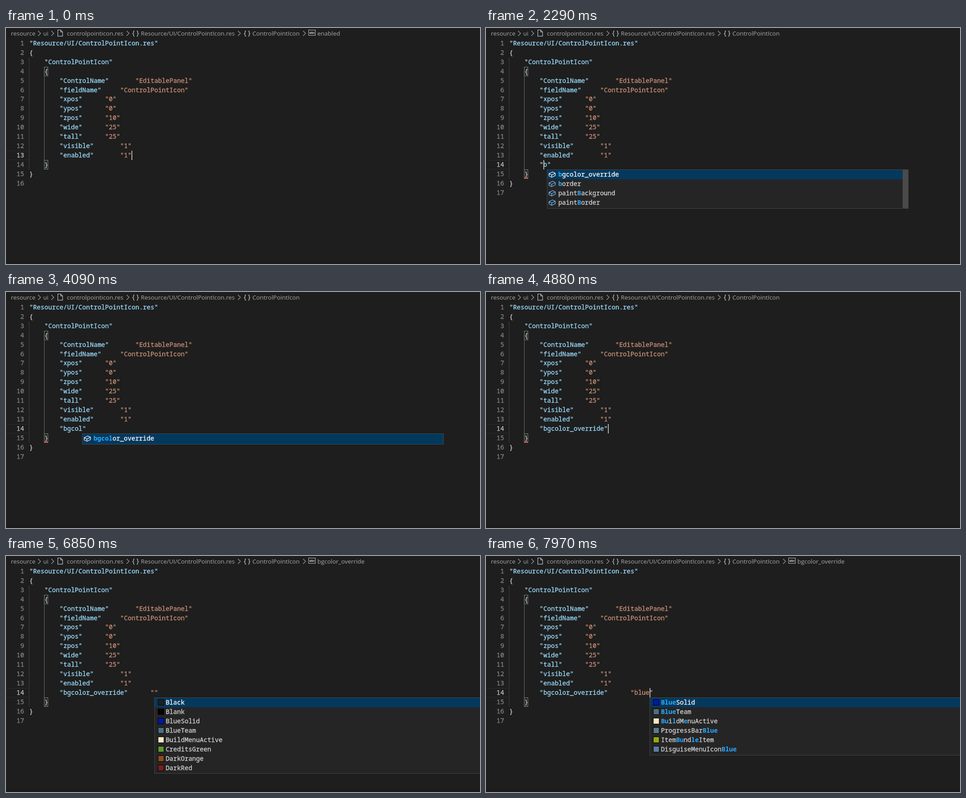
An HTML page with a canvas for the animation above (7.99 s loop, 1058 by 529 pixels).

```html
<!DOCTYPE html>
<html lang="en">
<head>
<meta charset="utf-8">
<title>Editor completion</title>
<style>
  html, body { margin: 0; width: 100%; height: 100%; overflow: hidden; background: #1e1e1e; }
  canvas { display: block; }
</style>
</head>
<body>
<canvas width="1058" height="529"></canvas>
<script>
const ctx = document.querySelector('canvas').getContext('2d');
const LOOP = 7990;
const LEFT = 51.945, CHAR = 8.455, TOP = 23.9, ROW = 20.93;
const MONO = '14.2px "Noto Sans Mono", monospace';
const SANS = '13.45px "Open Sans", "Noto Sans", sans-serif';
const KEY = '#9cdcfe', VALUE = '#ce9178', PLAIN = '#d4d4d4';

const colX = col => LEFT + col * CHAR;
const rowY = row => TOP + (row - 1) * ROW;

const pair = (key, value) => `\t\t"${key}"\t\t"${value}"`;
const HEAD = [
  '"Resource/UI/ControlPointIcon.res"', '{', '\t"ControlPointIcon"', '\t{',
  pair('ControlName', 'EditablePanel'), pair('fieldName', 'ControlPointIcon'),
  pair('xpos', 0), pair('ypos', 0), pair('zpos', 10), pair('wide', 25), pair('tall', 25),
  pair('visible', 1), pair('enabled', 1)
];
const TAIL = ['\t}', '}', ''];

const SWATCHES = {
  Black: '#1e1e1e', Blank: '#000', BlueSolid: '#0018a4', BlueTeam: '#4d6d7e',
  HudBlack: '#111', BuildMenuActive: '#ffe6c4', ProgressBarBlue: '#5b7a8c',
  TransparentBlack: '#000', ItemBundleItem: '#93a90c', DisguiseMenuIconBlue: '#5b7aa2',
  CreditsGreen: '#5e9631', DarkOrange: '#904a1e', DarkRed: '#781e1e', HudPanelBorder: '#35302c'
};

// Matched letters stand in square brackets.
const list = (col, items, swatches = false) => ({ col, swatches, items: items.split(' ') });
const props = (col, items) => list(col, items);
const colors = (col, items) => list(col, items, true);

const OVERRIDE = '"bgcolor_override"';
const STEPS = [
  [0, { entry: null, row: 13, caret: 27, on: true, crumb: 'enabled', popup: null, error: false, bar: false }],
  [180, { on: false }],
  [610, { on: true }],
  [1040, { on: false }],
  [1070, { entry: '' }],
  [1100, { row: 14, caret: 8 }],
  [1130, { on: true }],
  [1410, { crumb: '' }],
  [1590, { on: false }],
  [1770, { entry: '""' }],
  [1800, { on: true, caret: 9 }],
  [1850, { popup: props(9, 'alpha autoResize bgcolor_override border centerwrap command default font') }],
  [1890, { error: true }],
  [2290, { entry: '"b"', bar: true, popup: props(10, '[b]gcolor_override [b]order paint[B]ackground paint[B]order') }],
  [2310, { caret: 10 }],
  [2340, { bar: false }],
  [2580, { entry: '"bg"' }],
  [2610, { caret: 11 }],
  [2640, { popup: props(11, '[bg]color_override paint[B]ack[g]round') }],
  [2940, { entry: '"bgc"' }],
  [2960, { caret: 12 }],
  [2990, { popup: props(12, '[bgc]olor_override paint[B]a[c]k[g]round') }],
  [3240, { entry: '"bgco"' }],
  [3270, { caret: 13 }],
  [3300, { popup: props(13, '[bgco]lor_override paint[B]a[c]k[g]r[o]und') }],
  [3510, { entry: '"bgcol"' }],
  [3540, { caret: 14 }],
  [3590, { popup: props(14, '[bgcol]or_override') }],
  [4090, { on: false }],
  [4240, { popup: null }],
  [4270, { entry: OVERRIDE }],
  [4300, { caret: 25, on: true }],
  [4610, { caret: 26 }],
  [4910, { entry: OVERRIDE + '\t' }],
  [4940, { caret: 28 }],
  [5250, { entry: OVERRIDE + '\t\t' }],
  [5280, { caret: 32 }],
  [5810, { on: false }],
  [6240, { on: true }],
  [6300, { entry: OVERRIDE + '\t\t""' }],
  [6330, { caret: 33 }],
  [6360, { popup: colors(33, 'Black Blank BlueSolid BlueTeam BuildMenuActive CreditsGreen DarkOrange DarkRed') }],
  [6390, { error: false }],
  [6670, { crumb: 'bgcolor_override' }],
  [6850, { on: false }],
  [7100, { entry: OVERRIDE + '\t\t"b"' }],
  [7120, { caret: 34, on: true }],
  [7150, { popup: colors(34, '[B]lack [B]lank [B]lueSolid [B]lueTeam [B]uildMenuActive Hud[B]lack HudPanel[B]order Progress[B]arBlue') }],
  [7340, { entry: OVERRIDE + '\t\t"bl"' }],
  [7360, { caret: 35, popup: colors(35, '[Bl]ack [Bl]ank [Bl]ueSolid [Bl]ueTeam Hud[Bl]ack [B]ui[l]dMenuActive ProgressBar[Bl]ue Transparent[Bl]ack') }],
  [7700, { entry: OVERRIDE + '\t\t"blu"' }],
  [7730, { caret: 36 }],
  [7760, { popup: colors(36, '[Blu]eSolid [Blu]eTeam [Bu]i[l]dMenuActive ProgressBar[Blu]e Item[Bu]nd[l]eItem DisguiseMenuIcon[Blu]e') }],
  [7940, { entry: OVERRIDE + '\t\t"blue"' }],
  [7970, { caret: 37, popup: colors(37, '[Blue]Solid [Blue]Team [Bu]i[l]dM[e]nuActive ProgressBar[Blue] Item[Bu]nd[le]Item DisguiseMenuIcon[Blue]') }]
];

function stateAt(time) {
  return Object.assign({}, ...STEPS.filter(([start]) => start <= time).map(([, change]) => change));
}

function rect(x, y, w, h, color) {
  ctx.fillStyle = color;
  ctx.fillRect(x, y, w, h);
}

function frame(x, y, w, h, color) {
  ctx.strokeStyle = color;
  ctx.lineWidth = 1;
  ctx.strokeRect(x + .5, y + .5, w - 1, h - 1);
}

function polyline(color, width, ...points) {
  ctx.strokeStyle = color;
  ctx.lineWidth = width;
  ctx.beginPath();
  points.forEach(([x, y]) => ctx.lineTo(x, y));
  ctx.stroke();
}

// Lays letters on the fixed character grid and returns the end position.
// A hairline outline gives regular letters a slightly heavier weight.
function mono(text, x, top, color, bold = false) {
  const baseline = Math.round(top + 15);
  ctx.font = (bold ? 'bold ' : '') + MONO;
  ctx.fillStyle = ctx.strokeStyle = color;
  ctx.lineWidth = .3;
  for (const letter of text) {
    ctx.fillText(letter, x, baseline);
    if (!bold) ctx.strokeText(letter, x, baseline);
    x += CHAR;
  }
  return x;
}

function sans(text, x) {
  ctx.font = SANS;
  ctx.fillStyle = '#a9a9a9';
  ctx.fillText(text, x, 17);
}

function drawBreadcrumbs(last) {
  const chevron = x => polyline('#a0a0a0', 1.2, [x - 2.8, 6.5], [x + 2.8, 12], [x - 2.8, 17.5]);
  const braces = x => {
    ctx.font = '15px "Noto Sans Mono", monospace';
    ctx.fillStyle = '#cccccc';
    ctx.fillText('{', x - 2, 16);
    ctx.fillText('}', x + 7.5, 16);
  };
  sans('resource', 11);
  chevron(74.5);
  sans('ui', 83);
  chevron(104);
  polyline('#b8c4cc', 1.2, [122, 4.5], [115.6, 4.5], [115.6, 18.4], [126.4, 18.4], [126.4, 9], [122, 4.5], [122, 9], [126.4, 9]);
  sans('controlpointicon.res', 136);
  chevron(272);
  braces(282);
  sans('Resource/UI/ControlPointIcon.res', 301);
  chevron(520.5);
  braces(531);
  sans('ControlPointIcon', 550);
  if (!last) return;
  chevron(666);
  frame(675, 4, 16, 13, '#c5c5c5');
  ctx.font = 'bold 7px "Noto Sans", sans-serif';
  ctx.fillStyle = '#d0d0d0';
  ctx.fillText('abc', 677, 12.5);
  sans(last, 695);
}

function drawCode(text, top) {
  let col = 0, color = KEY;
  for (const token of text.match(/\t|"[^"]*"|[{}]/g) || []) {
    if (token === '\t') {
      col += 4 - col % 4;
      continue;
    }
    mono(token, colX(col), top, token[0] === '"' ? color : PLAIN);
    if (token[0] === '"') color = VALUE;
    col += token.length;
  }
}

function drawEditor(state) {
  const added = state.entry === null ? [] : ['\t\t' + state.entry];
  const lines = [...HEAD, ...added, ...TAIL];
  const closeRow = lines.length - 2;

  const activeY = Math.round(rowY(state.row));
  rect(0, activeY, 50, 1, '#2c2c2c');
  rect(0, activeY + 20, 50, 1, '#2c2c2c');
  rect(51, rowY(3), 1, rowY(closeRow + 1) - rowY(3), '#404040');
  rect(85, rowY(5), 1, rowY(closeRow) - rowY(5), '#707070');
  for (const row of [4, closeRow]) {
    const y = Math.round(rowY(row));
    rect(85, y, 9, 21, '#1b251b');
    frame(85, y, 9, 21, '#888888');
  }

  lines.forEach((text, i) => {
    const number = String(i + 1);
    mono(number, 40.5 - number.length * CHAR, rowY(i + 1), i + 1 === state.row ? '#c6c6c6' : '#858585');
    drawCode(text, rowY(i + 1));
  });

  if (state.error) {
    const y = rowY(closeRow + 1) - 1.5;
    polyline('#f14c4c', 1.2, ...[0, 1, 2, 3, 4].map(i => [85.5 + 2 * i, y + (i % 2 ? -1 : 1)]));
  }
  if (state.on) rect(Math.round(colX(state.caret)), activeY, 2, 21, '#aeafad');
}

function drawCube(x, y, color) {
  const at = (px, py) => [x + px * 1.08, y + py * 1.08];
  polyline(color, 1.2, at(1.5, 6), at(9, 2.4), at(14.5, 5.2), at(14.5, 10), at(7, 13.6),
    at(1.5, 10.8), at(1.5, 6), at(7, 8.8), at(14.5, 5.2));
  polyline(color, 1.2, at(7, 8.8), at(7, 13.6));
}

function drawPopup({ col, items, swatches }, bar) {
  const x = Math.round(colX(col)), y = 317, width = 807;
  const height = Math.round(items.length * ROW + 4);
  rect(x, y, width, height, '#252526');
  rect(x + 1, y + 1, width - 2, items.length === 1 ? height - 2 : 21, '#04395e');
  frame(x, y, width, height, '#454545');
  items.forEach((item, i) => {
    const top = y + 1 + i * ROW;
    if (swatches) {
      const swatchY = Math.round(top + 3);
      rect(x + 8, swatchY, 14, 14, '#000');
      rect(x + 9, swatchY + 1, 12, 12, SWATCHES[item.replace(/[\[\]]/g, '')]);
    } else {
      drawCube(x + 3, top + 2, i ? '#75beff' : '#ffffff');
    }
    let textX = x + 25.4;
    item.split(/[\[\]]/).forEach((part, k) => {
      const matched = k % 2 === 1;
      textX = mono(part, textX, top, matched ? '#2aaaff' : i ? PLAIN : '#ffffff', matched);
    });
  });
  if (bar) rect(x + width - 13, y + 1, 12, height - 2, '#4a4a4b');
}

function draw() {
  const state = stateAt(performance.now() % LOOP);
  rect(0, 0, 1058, 529, '#1e1e1e');
  rect(0, 524, 1058, 5, '#1b1b1b');
  drawBreadcrumbs(state.crumb);
  drawEditor(state);
  if (state.popup) drawPopup(state.popup, state.bar);
  requestAnimationFrame(draw);
}
requestAnimationFrame(draw);
</script>
</body>
</html>
```
